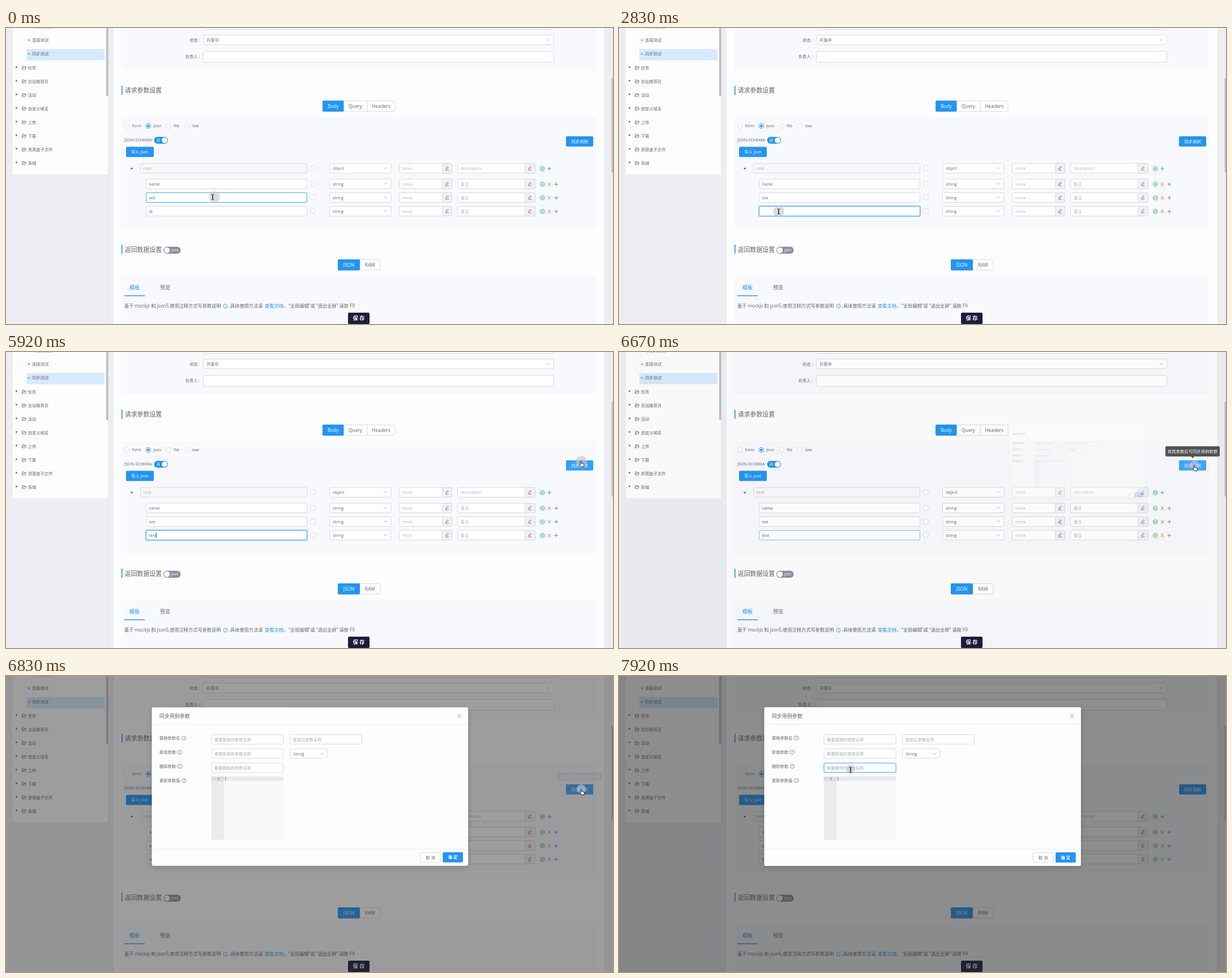
An HTML page for the animation above (8000 ms loop, 1072 px wide and 522 px high).

```html
<!DOCTYPE html>
<html lang="zh-CN">
<head>
<meta charset="utf-8">
<title>同步用例参数</title>
<style>
html, body { margin: 0; width: 100%; height: 100%; overflow: hidden; background: #eceef2; }
svg { display: block; width: 1072px; height: 522px; }
text { font-family: "Open Sans", "Noto Sans CJK SC", "Noto Sans CJK", "Noto Sans", sans-serif; white-space: pre; }
</style>
</head>
<body>
<svg id="stage" viewBox="0 0 1072 522" xmlns="http://www.w3.org/2000/svg"></svg>
<script>
const LOOP = 8000, STEP = 1000 / 12;
const BLUE = '#2395f1', HOVER = '#40a9ff', LINE = '#d9dade', INK = '#62646a', PALE = '#b0b2b8', PANEL = '#f8f9fc';

// ---- markup helpers ----
const text = (x, cy, str, size = 7.3, fill = INK, more = '') =>
  `<text x="${x}" y="${cy + size * 0.36}" font-size="${size}" fill="${fill}" ${more}>${str}</text>`;
const mid = (x, cy, str, size, fill, more = '') => text(x, cy, str, size, fill, `text-anchor="middle" ${more}`);
const rect = (x, y, w, h, fill, more = '') =>
  `<rect x="${x}" y="${y}" width="${w}" height="${h}" fill="${fill}" ${more}/>`;
const path = (d, color, w = 0.9, more = '') =>
  `<path d="${d}" fill="none" stroke="${color}" stroke-width="${w}" ${more}/>`;
const dot = (x, y, r, fill, more = '') => `<circle cx="${x}" cy="${y}" r="${r}" fill="${fill}" ${more}/>`;
const box = (x, y, w, h, fill = '#fff', line = LINE, more = '') =>
  rect(x + 0.5, y + 0.5, w - 1, h - 1, fill, `rx="2" stroke="${line}" ${more}`);
const solid = (x, y, w, h, str, size = 7.3, fill = BLUE, more = '') =>
  rect(x, y, w, h, fill, 'rx="2"') + mid(x + w / 2, y + h / 2, str, size, '#fff', more);
const chevron = (x, y) => path(`M${x - 2.8} ${y - 1.4}l2.8 2.8 2.8-2.8`, '#a9abb1');
const help = (x, y, c) => dot(x, y, 3.6, 'none', `stroke="${c}" stroke-width=".8"`) + mid(x, y, '?', 6, c);
const pencil = (x, y) => path(`M${x - 2.4} ${y + 1.4}l.3-1.6 3-3 1.4 1.4-3 3zM${x - 3} ${y + 3.2}h6`, '#66686e', 0.8);
const plus = (x, y) => path(`M${x - 3.3} ${y}h6.6M${x} ${y - 3.3}v6.6`, BLUE);
const gear = (x, y) =>
  path(`M${x - 3.5} ${y - 2}l3.5-2 3.5 2v4l-3.5 2-3.5-2z`, '#2fb566', 1) + dot(x, y, 1.3, 'none', 'stroke="#2fb566" stroke-width=".9"');

// ---- page ----
function sidebar() {
  let s = rect(12, 0, 168, 258, '#fdfdfe') + rect(180, 0, 1, 522, '#e3e7f0') + rect(36, 37, 138, 20, '#d7eafc');
  s += text(46, -2.5, '不分类测试') + text(46, 21.5, '连接测试') + text(46, 45.5, '同步测试');
  s += dot(40.5, 21.5, 1.9, '#4fdcec') + dot(40.5, 45.5, 1.9, '#4fdcec');
  '任务,总站推荐页,活动,自定义域名,上传,下载,资源盒子文件,商城'.split(',').forEach((name, i) => {
    const y = 70 + 24 * i;
    s += `<path d="M17.5 ${y - 3}l3 2-3 2z" fill="#55575c"/>`;
    s += path(`M28.8 ${y + 3}v-5.8h2.4l.8 1h2.4v1.5M28.8 ${y + 3}l1.4-3.3h5.4l-1.3 3.3z`, '#6b6d72', 0.8);
    s += text(38.7, y, name);
  });
  return s + rect(176.8, 0, 3.8, 120, '#c0c1c6', 'rx="1.5"');
}

function fieldRow(y, name, type, root) {
  const x = root ? 237 : 247;
  let s = box(x, y - 9, 532 - x, 18, root ? '#f8f8fa' : '#fff');
  if (name) s += text(x + 5.5, y, name, 7.2, root ? '#a5a7ad' : INK);
  s += box(537, y - 5, 9.5, 9.5) + box(571, y - 9, 109.5, 18) + text(577, y + 0.3, type, 7.2) + chevron(670, y - 0.5);
  s += box(694, y - 9, 94, 18) + box(770, y - 9, 18, 18, '#f1f1f4') + text(700, y, 'mock', 7.1, PALE) + pencil(779, y);
  s += box(797, y - 9, 138, 18) + box(916, y - 9, 19, 18, '#f1f1f4') + pencil(925.3, y);
  s += text(803, y, root ? 'description' : '备注', 7, PALE) + gear(947.3, y + 0.5);
  return s + (root ? plus(959.5, y + 0.5)
    : path(`M957 ${y - 2.4}l5 6m0-6l-5 6`, '#f0682e', 1) + plus(971.7, y + 0.5));
}

function page() {
  let s = rect(0, 0, 1072, 522, '#eceef2') + sidebar() + rect(190, 0, 866, 522, '#fdfdfe');
  s += rect(204, 0, 838, 75, PANEL) + rect(204, 157, 838, 198, PANEL) + rect(204, 436, 838, 86, PANEL);
  s += rect(1069.5, 88, 2.5, 167, '#bfc0c5', 'rx="1"');
  s += box(348, -17, 620, 20) + box(348, 12, 620, 18) + box(348, 41, 620, 20);
  s += text(342.5, 21.5, '状态 :', 7.3, INK, 'text-anchor="end"') + text(342.5, 50.5, '负责人 :', 7.3, INK, 'text-anchor="end"');
  s += text(354, 21.5, '开发中') + chevron(958, 21);

  s += rect(204, 102, 1.6, 16, BLUE) + text(209.8, 110.5, '请求参数设置', 10.9);
  s += box(559, 128, 128.5, 19.5) + solid(559, 128, 37.5, 19.5, 'Body', 8.3) + path('M638 128v19', LINE, 1);
  s += mid(617, 137.8, 'Query', 8.4, INK) + mid(662.5, 137.8, 'Headers', 8.4, INK);
  [['form', 213.5], ['json', 251.3], ['file', 287], ['raw', 319.2]].forEach(([name, x], i) => {
    s += dot(x, 172.7, 4.2, '#fff', `stroke="${i === 1 ? BLUE : LINE}"`) + text(x + 9, 172.5, name, 7.2);
  });
  s += dot(251.3, 172.7, 2.3, BLUE);
  s += text(209, 197.5, 'JSON-SCHEMA:', 7.2) + rect(261.5, 192, 24.5, 12, BLUE, 'rx="6"');
  s += mid(269, 198, '开', 7, '#fff') + dot(280, 198, 4.9, '#fff');
  s += solid(212, 209.5, 49, 18, '导入 json') + rect(989, 191, 48, 18, BLUE, 'rx="2"');
  s += rect(989, 191, 48, 18, HOVER, 'rx="2" id="btnHover"') + mid(1013, 200, '同步用例', 7.4, '#fff');
  s += '<path d="M219.6 246.8h5l-2.5 3z" fill="#55575c"/>';
  s += fieldRow(247.5, 'root', 'object', true) + fieldRow(275, 'name', 'string') + fieldRow(299, 'sex', 'string') + fieldRow(323, '', 'string');
  s += box(247, 290, 285, 18, 'none', HOVER, 'id="hover2"');
  s += rect(246.6, 313.6, 285.8, 18.8, 'none', 'rx="2.5" stroke="#8cc8ff" stroke-width="1.8" id="glow"');
  s += box(247, 314, 285, 18, 'none', HOVER, 'id="hover3"');
  s += '<text id="typed" x="252.5" y="325.6" font-size="7.3" fill="#62646a"></text>' + rect(0, 318.5, 0.8, 9.5, '#333', 'id="caret"');
  s += path('M252.5 328.3h0', '#777', 0.7, 'id="under" stroke-dasharray="1 .8"');

  s += rect(204, 382, 1.6, 16, BLUE) + text(209.8, 391, '返回数据设置', 10.9);
  s += rect(278, 385.8, 30.5, 12.2, '#8c8ea3', 'rx="6.1"') + dot(284.2, 391.9, 5, '#fff') + text(291.8, 391.8, 'json', 6.5, '#fff');
  s += box(586, 408, 75.5, 19.5) + solid(586, 408, 39, 19.5, 'JSON', 8.4) + mid(642.8, 417.8, 'RAW', 8.4, INK);
  s += text(218, 458, '模板', 9.1, BLUE) + text(272, 458, '预览', 9.1) + rect(209, 471.5, 36, 1.4, BLUE);
  s += text(209, 490.5, '基于 mockjs 和 json5,使用注释方式写参数说明', 8.2) + help(387.5, 490.5, BLUE);
  s += text(394, 490.5, ',具体使用方法请', 8.2) + text(457, 490.5, '查看文档', 8.3, BLUE) + text(490.5, 490.5, '，', 8.2);
  s += text(499, 490.5, '“全局编辑”或 “退出全屏” 请按 F9', 8.2);
  return s + solid(604, 502, 38, 20, '保 存', 9.2, '#1d1c3b', 'font-weight="600"');
}

// ---- overlays ----
function dialog() {
  let s = rect(256.5, 55, 559.3, 280, '#fdfdfe', 'rx="2.5" filter="url(#shade)"');
  s += path('M257 85.5h558.5M257 305.5h558.5', '#ececf0', 1) + text(269.7, 70.5, '同步用例参数', 9.05);
  s += path('M797 67.3l6.2 6.4m0-6.4l-6.2 6.4', '#8b8d93', 0.9);
  ['替换参数名', '新增参数', '删除参数', '更新参数值'].forEach((name, i) => {
    const y = 109.3 + 25 * i;
    s += text(270, y, name + ':', 7.25) + help(name.length > 4 ? 313.3 : 306, y, '#76787e');
    if (i < 3) s += box(361.5, y - 6.3, 128, 17.5) + text(367, y + 2.6, `需要${name.slice(0, 2)}的参数名称`, 7.25, '#a9abb2');
  });
  s += box(361.5, 153, 128, 17.5, 'none', HOVER, 'id="hoverDel"');
  s += box(500.3, 103, 127.7, 17.5) + text(506, 111.9, '更新后参数名称', 7.25, '#a9abb2');
  s += box(500.3, 128, 66.7, 17.5) + text(506.5, 137, 'String', 7.2) + chevron(557.5, 136.8);
  s += rect(361.7, 177.3, 127.6, 111.5, '#f9f9fc') + rect(361.7, 177.3, 22.5, 111.5, '#ebebee');
  s += rect(384.2, 177.3, 105.1, 7.8, '#e9eaee') + rect(361.7, 177.3, 22.5, 7.8, '#dcdde1');
  s += mid(374.7, 181.4, '1', 6.6, '#44464b') + rect(386.6, 177.8, 0.8, 7.2, '#66686e');
  s += box(731, 311, 36, 18) + mid(749, 320.2, '取 消', 7.3, INK);
  return s + solid(771, 311, 35.7, 18, '确 定', 7.3, BLUE, 'font-weight="600"');
}

const tooltip = () => rect(965, 166.3, 96, 18, '#505154', 'rx="2"') + '<path d="M1010.2 184h5.6l-2.8 3.4z" fill="#505154"/>' +
  mid(1013, 175.4, '修改参数后可同步用例参数', 7.33, '#fff');

const pointers = {
  beam: path('M-2.3-4.5q2.3 0 2.3 1.4v6.4q0 1.4-2.3 1.4M2.3-4.5q-2.3 0-2.3 1.4v6.4q0 1.4 2.3 1.4', '#111', 0.9),
  arrow: '<path d="M0 0v9.6l2.2-2 1.5 3.6 1.5-.6-1.5-3.6h3z" fill="#fff" stroke="#111" stroke-width=".8"/>',
  hand: '<path d="M-.9.6q.9-1.3 1.8 0v3.6l3.6.8q1 .3.8 1.5l-.7 3.9h-4.4l-2.9-4q-.2-1.4 1.8-.3z" fill="#fff" stroke="#111" stroke-width=".9"/>'
};

document.getElementById('stage').innerHTML =
  '<defs><filter id="shade" x="-10%" y="-10%" width="120%" height="125%"><feDropShadow dx="0" dy="2" stdDeviation="4" flood-opacity=".18"/></filter></defs>' +
  page() +
  `<g id="ime">${rect(253, 335, 303, 17.5, '#fcfcfd', 'stroke="#cfd0d5" stroke-width=".8" id="imeBar"')}` +
  '<text id="imeList" x="256" y="346.6" font-size="7.5" fill="#44464b"></text></g>' +
  rect(0, 0, 1072, 522, 'rgba(40,40,40,.52)', 'id="mask"') +
  `<g id="tip">${tooltip()}</g><g id="dialog">${dialog()}</g>` +
  dot(0, 0, 10, '#c6c6ca', 'id="halo" fill-opacity=".62"') +
  Object.entries(pointers).map(([k, v]) => `<g id="${k}">${v}</g>`).join('');

// ---- motion ----
const el = {};
document.querySelectorAll('[id]').forEach(n => el[n.id] = n);
const set = (id, attrs) => { for (const k in attrs) el[id].setAttribute(k, attrs[k]); };
const ramp = (t, a, b) => Math.max(0, Math.min(1, (t - a) / (b - a)));
const pulse = (t, a, b, up, down) => ramp(t, a, a + up) * (1 - ramp(t, b, b + down));
const between = (t, a, b) => t >= a && t < b;

// cubic-bezier(.08, .82, .17, 1)
function zoomEase(x) {
  let lo = 0, hi = 1;
  for (let i = 0; i < 24; i++) {
    const u = (lo + hi) / 2, v = 1 - u;
    if (0.24 * u * v * v + 0.51 * u * u * v + u * u * u < x) lo = u; else hi = u;
  }
  const u = (lo + hi) / 2, v = 1 - u;
  return 2.46 * u * v * v + 3 * u * u * v + u * u * u;
}

const ROUTE = [
  [-20, 368, 298], [0, 365, 298], [400, 312, 308], [830, 282, 323.5], [4670, 282, 323.5], [4750, 281, 325],
  [5000, 254, 400.5], [5085, 254, 400.5], [5330, 440, 365], [5670, 1058, 225], [5850, 1018, 196], [5915, 1015.5, 192],
  [6170, 1016, 199], [7590, 1016, 200], [7667, 920, 193], [7750, 610, 176], [7833, 409, 160], [7915, 409, 165.5]
];
function spot(t) {
  let i = 1;
  while (i < ROUTE.length - 1 && ROUTE[i][0] < t) i++;
  const [t0, x0, y0] = ROUTE[i - 1], [t1, x1, y1] = ROUTE[i], k = ramp(t, t0, t1);
  return [x0 + (x1 - x0) * k, y0 + (y1 - y0) * k];
}
function pointerAt(t, x, y) {
  if (between(t, 5840, 7600)) return 'hand';
  if (t >= 7600) return x > 361 && x < 490 && y > 153 && y < 171 ? 'beam' : 'arrow';
  return x > 247 && x < 532 && [275, 299, 323].some(r => Math.abs(y - r) < 12) ? 'beam' : 'arrow';
}

// start time and content of the edited field
const TYPING = [[0, 'id'], [2500, 'i'], [2830, ''], [3166, 't'], [3416, 'te'], [3666, 'tes'], [3833, 'test']];
const CANDIDATES = {
  t: '1 他   2 她   3 天   4 听   5 图   6 太   7 通',
  te: '1 特   2 忒   3 特别   4 特点   5 特殊',
  tes: '1 特色   2 特设   3 特赦   4 特使   5 tes',
  test: '1 test   2 特设台   3 特色图   4 特色   5 特'
};
const CARET_ON = [[1083, 2166], [2500, 2666], [3166, 5000], [5500, 6000], [6500, 6600]];

function render(t) {
  const word = TYPING.filter(k => k[0] <= t).pop()[1];
  el.typed.textContent = word;
  const end = 252.5 + (word ? el.typed.getComputedTextLength() : 0);
  set('caret', { x: end, opacity: +CARET_ON.some(c => between(t, c[0], c[1])) });
  const composing = between(t, 3166, 4330);
  set('under', { d: `M252.5 328.3H${end}`, opacity: +composing });
  set('ime', { opacity: between(t, 3240, 4500) ? 1 - ramp(t, 4300, 4500) : 0 });
  set('imeBar', { width: t < 3660 ? 303 : 373 });
  el.imeList.textContent = CANDIDATES[word] || '';

  set('hover2', { opacity: 1 - ramp(t, 380, 620) });
  set('hover3', { opacity: pulse(t, 560, 6500, 220, 330) });
  set('glow', { opacity: 0.6 * pulse(t, 1040, 6400, 280, 250) });
  set('btnHover', { opacity: pulse(t, 5780, 7600, 250, 200) });
  set('hoverDel', { opacity: ramp(t, 7740, 7900) });

  const tipIn = ramp(t, 5970, 6080), tipOut = ramp(t, 6745, 6843), tipScale = 0.8 + 0.2 * tipIn * (1 - tipOut);
  set('tip', { opacity: tipIn * (1 - tipOut), transform: `translate(1013 188) scale(${tipScale}) translate(-1013 -188)` });

  const zoom = zoomEase(ramp(t, 6660, 6860));
  set('mask', { opacity: ramp(t, 6660, 6860) });
  set('dialog', {
    opacity: t < 6660 ? 0 : zoom,
    transform: `translate(1016 200) scale(${0.2 + 0.8 * zoom}) translate(-1016 -200)`
  });

  const [x, y] = spot(t), [hx, hy] = spot(t - 20), kind = pointerAt(t, x, y);
  set('halo', { cx: hx, cy: hy, r: between(t, 6580, 6920) || t > 7600 ? 8 : 10 });
  for (const k in pointers) set(k, { transform: `translate(${x} ${y})`, opacity: +(k === kind) });
}

function tick(now) {
  const t = now % LOOP;
  render(Math.floor((t + 4) / STEP) * STEP % LOOP);
  requestAnimationFrame(tick);
}
render(0);
requestAnimationFrame(tick);
</script>
</body>
</html>
```
